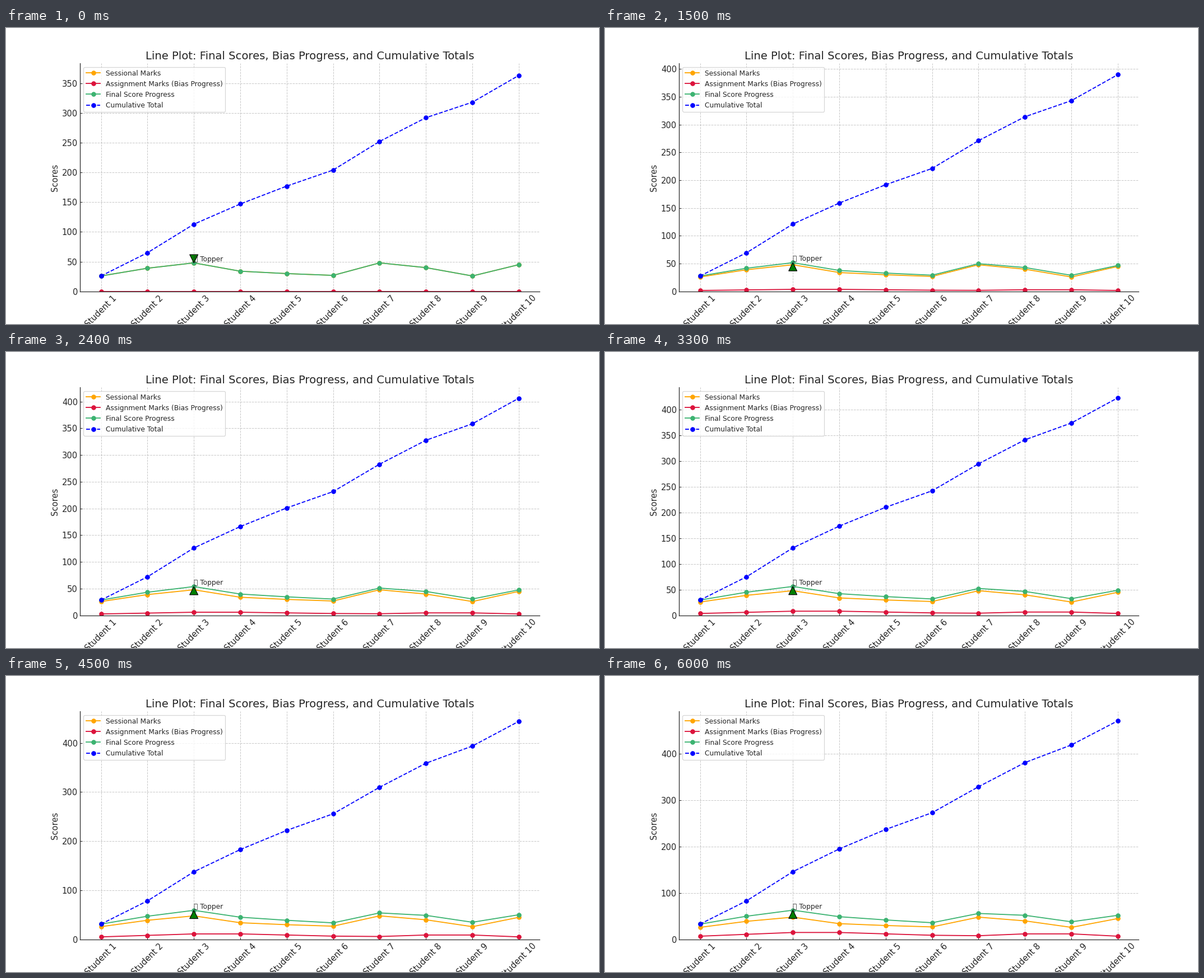
Write a matplotlib script that moves like this. It is 1058x529 px and loops after 6.3 s.

```python
import numpy as np
import matplotlib.pyplot as plt
from matplotlib.animation import FuncAnimation

WIDTH = 1058
STEPS = 20
INTERVAL = 300

INK = "#262626"
plt.rcParams.update({
    "font.family": "DejaVu Sans",
    "font.size": 10,
    "text.color": INK,
    "axes.labelcolor": INK,
    "axes.edgecolor": INK,
    "axes.linewidth": 1.0,
    "axes.spines.top": False,
    "axes.spines.right": False,
    "axes.titlesize": 16,
    "axes.labelsize": 12,
    "xtick.labelsize": 12,
    "ytick.labelsize": 12,
    "xtick.color": INK,
    "ytick.color": INK,
    "xtick.direction": "in",
    "ytick.direction": "in",
})

sessional = np.array([26, 39, 48, 34, 30, 27, 48, 40, 26, 45])
assignment = np.array([7, 11, 15, 15, 12, 9, 8, 12, 12, 7])
top = int(np.argmax(sessional + assignment))
x = np.arange(len(sessional))

fig, ax = plt.subplots(figsize=(12, 6), dpi=WIDTH / 12)


def add_line(label, color, style="-"):
    return ax.plot(x, sessional, style, marker="o", color=color,
                   linewidth=1.5, label=label)[0]


sessional_line = add_line("Sessional Marks", "orange")
bias_line = add_line("Assignment Marks (Bias Progress)", "crimson")
final_line = add_line("Final Score Progress", "mediumseagreen")
total_line = add_line("Cumulative Total", "blue", "--")

# The trophy has no glyph in the font and shows as an empty box.
note = ax.annotate("\U0001F3C6 Topper", xy=(top, 0), xytext=(top, 0),
                   fontsize=10,
                   arrowprops=dict(facecolor="green", shrink=0.05))

ax.set_title("Line Plot: Final Scores, Bias Progress, and Cumulative Totals")
ax.set_ylabel("Scores")
ax.set_xticks(x, [f"Student {i + 1}" for i in x], rotation=45)
ax.grid(True, linestyle="--", alpha=0.7)
ax.legend(loc="upper left", fontsize=10)


def update(step):
    bias = assignment * step / STEPS
    final = sessional + bias
    total = np.cumsum(final)
    bias_line.set_ydata(bias)
    final_line.set_ydata(final)
    total_line.set_ydata(total)
    note.xy = (top, final[top])
    note.set_position((top, final[top] + 3))
    ax.set_ylim(0, total[-1] + 20)
    return bias_line, final_line, total_line, note


anim = FuncAnimation(fig, update, frames=STEPS + 1, interval=INTERVAL,
                     init_func=lambda: update(0), repeat=True,
                     repeat_delay=0, blit=False)
plt.show()
```
